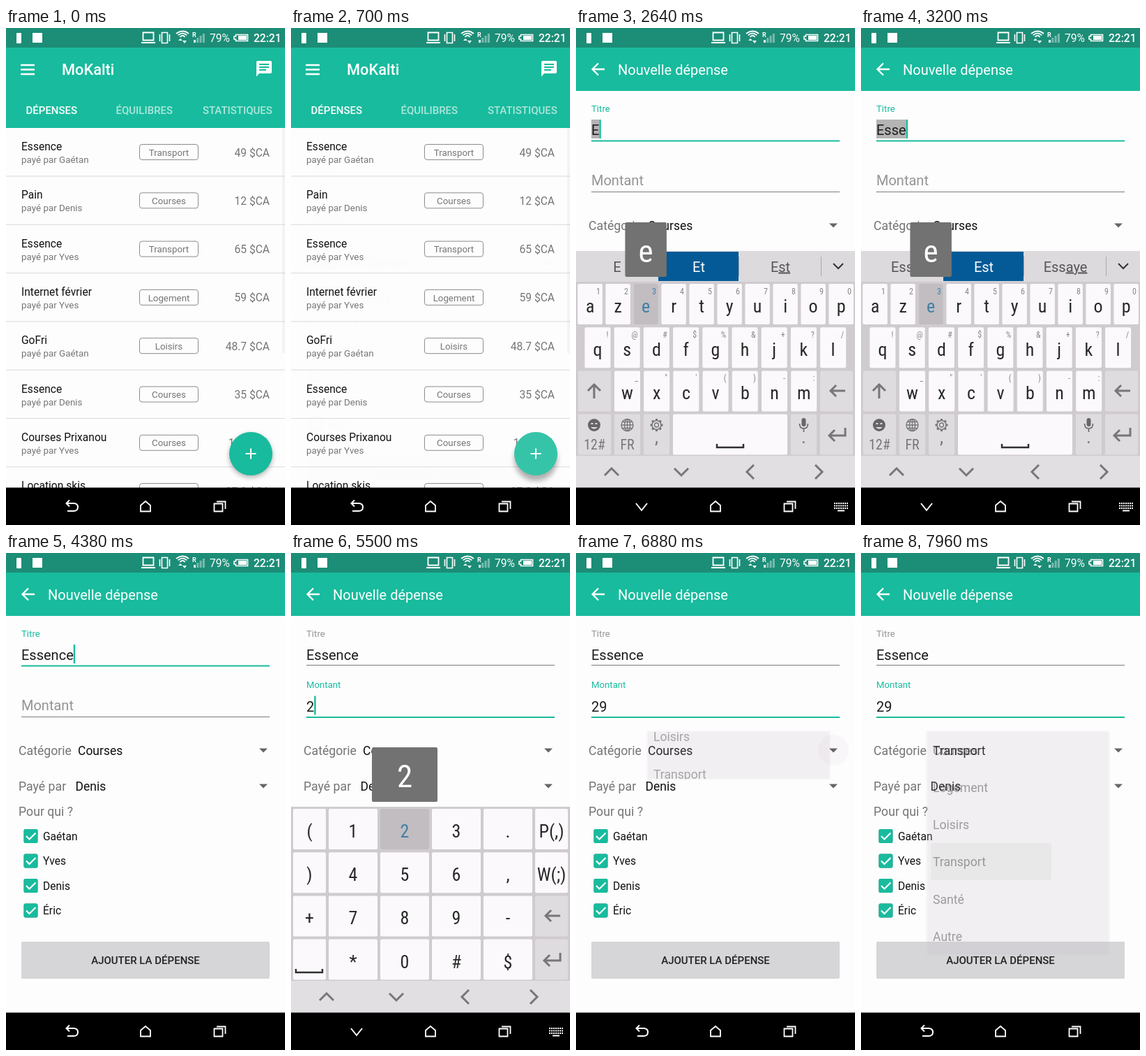
An HTML page for the animation above (8000 ms loop, 400 by 711 pixels).

```html
<!DOCTYPE html>
<html lang="fr">
<head>
<meta charset="utf-8">
<title>Nouvelle dépense</title>
<style>
html, body { margin: 0; width: 100%; height: 100%; overflow: hidden; background: #fdfdfd; }
svg { display: block; width: 100vw; height: 100vh; font-family: Roboto, "Noto Sans", sans-serif; }
text { white-space: pre; }
#letters, #numbers, #press { font-family: "Roboto Condensed", Roboto, "Noto Sans", sans-serif; font-stretch: condensed; }
</style>
</head>
<body>
<svg id="stage" viewBox="0 0 400 711"></svg>
<script>
const LOOP = 8000, TEAL = '#18bb9d', GREY = '#757575', PAPER = '#fdfdfd';
const esc = s => s.replace(/&/g, '&amp;').replace(/</g, '&lt;');
const text = (x, y, size, str, fill = '#111', more = '') =>
  `<text x="${x}" y="${y}" font-size="${size}" fill="${fill}" ${more}>${esc(str)}</text>`;
const mid = (x, y, size, str, fill, more = '') => text(x, y, size, str, fill, 'text-anchor="middle" ' + more);
const rect = (x, y, w, h, fill, more = '') =>
  `<rect x="${x}" y="${y}" width="${w}" height="${h}" fill="${fill}" ${more}/>`;
const line = (d, stroke = '#fff', w = 2, more = '') =>
  `<path d="${d}" fill="none" stroke="${stroke}" stroke-width="${w}" ${more}/>`;
const shape = (d, fill = '#fff', more = '') => `<path d="${d}" fill="${fill}" ${more}/>`;
const group = (id, body, more = '') => `<g id="${id}" ${more}>${body}</g>`;
const BOLD = 'font-weight="500"';

const people = ['Gaétan', 'Yves', 'Denis', 'Éric'];
const categories = ['Courses', 'Logement', 'Loisirs', 'Transport', 'Santé', 'Autre'];
const expenses = [
  ['Essence', 0, 3, '49'], ['Pain', 2, 0, '12'], ['Essence', 1, 3, '65'],
  ['Internet février', 1, 1, '59'], ['GoFri', 0, 2, '48.7'], ['Essence', 2, 0, '35'],
  ['Courses Prixanou', 1, 0, '120'], ['Location skis', 0, 2, '27.3']
];

function statusBar() {
  const wifi = [4, 7, 10].map(r =>
    line(`M${253 - r * .9} ${16 - r * .8}Q253 ${14 - r * 1.3} ${253 + r * .9} ${16 - r * .8}`, '#fff', 1.8)).join('');
  const bars = [0, 1, 2, 3].map(i =>
    rect(269 + i * 4.3, 17 - i * 3, 3, 4 + i * 3, '#fff', `opacity="${i ? .4 : .9}"`)).join('');
  return rect(0, 0, 400, 28, '#1c8d77') + rect(15, 7, 7, 15, '#fff', 'rx="1"') +
    rect(38, 7, 14, 14, '#fff') +
    line('M196.500 6.500H211.500V17.500H196.500ZM194 21H214', '#fff', 1.8) +
    line('M223.500 6.500H231.500V21.500H223.500ZM220.500 9V19M234.500 9V19', '#fff', 1.6) +
    wifi + shape('M247 18l3-3 3 3zM253 18h6l-3 4z') + bars +
    text(267, 13, 9, 'R', '#fff', 'font-weight="700"') +
    text(292, 20, 15.6, '79%', '#fff') +
    line('M329.500 9.500H346.500V18.500H329.500V16H327V12H329.500Z', '#fff', 1.6) + rect(333, 11, 12, 6, '#fff') +
    text(355, 20, 15.6, '22:21', '#fff', BOLD);
}

function listScreen() {
  const rows = expenses.map(([title, who, cat, sum], i) => {
    const y = 69.3 * i;
    return `<g transform="translate(0 ${y})">` + text(22, 175, 15.6, title) +
      text(22, 193, 13.4, 'payé par ' + people[who], GREY) +
      rect(191.5, 166.5, 84, 22, 'none', 'rx="3.5" stroke="#8c8c8c"') +
      mid(233.5, 182.7, 13.3, categories[cat], GREY) +
      text(378, 183.5, 15.6, sum + ' $CA', GREY, 'text-anchor="end"') +
      rect(0, 211.5, 400, 1, '#dadada') + '</g>';
  }).join('');
  return rect(0, 28, 400, 683, PAPER) + rows + rect(396, 143, 4, 322, '#000', 'opacity=".04"') +
    rect(0, 28, 400, 115, TEAL) +
    line('M21 53H41M21 59.500H41M21 66H41', '#fff', 2.3) + text(80, 67, 21.8, 'MoKalti', '#fff', BOLD) +
    shape('M361 47H379Q381 47 381 49V63Q381 65 379 65H363L359 69.500V49Q359 47 361 47ZM363 51V53H377V51ZM363 55V57H377V55ZM363 59V61H373V59Z', '#fff', 'fill-rule="evenodd"') +
    text(28.5, 122.5, 15, 'DÉPENSES', '#fff', BOLD) +
    text(157.5, 122.5, 15, 'ÉQUILIBRES', '#fff', BOLD + ' opacity=".65"') +
    text(282, 122.5, 15, 'STATISTIQUES', '#fff', BOLD + ' opacity=".65"') +
    '<circle id="fabShade" cx="351" cy="612" r="31" opacity=".3" filter="url(#soft)"/>' +
    `<circle cx="351" cy="609" r="31" fill="${TEAL}"/>` +
    '<circle id="fabRipple" cx="351" cy="609" r="0" fill="#fff"/>' +
    line('M343.500 609H358.500M351 601.500V616.500');
}

const field = (id, label, y) =>
  text(22, y - 10, 20, label, GREY, `id="${id}Label"`) + rect(22, y, 356, 1, '#7c7c7c', `id="${id}Line"`) +
  rect(22, y - 30, 0, 27, '#b4b4b4', `id="${id}Mark"`) +
  text(22, y - 8, 20, '', '#1c1c1c', `id="${id}Text"`) +
  rect(0, y - 30, 2.4, 27, TEAL, `id="${id}Caret"`);

function formScreen() {
  const arrow = y => shape(`M363 ${y}H375L369 ${y + 6}Z`, '#666');
  const boxes = people.map((name, i) => {
    const y = 395 + 35.5 * i;
    return rect(26.5, y + 1, 18, 18, 'none', 'rx="2" stroke="#757575" stroke-width="2"') +
      `<g class="check">${rect(25.5, y, 20, 20, TEAL, 'rx="2"')}${line(`M29 ${y + 10}L33.500 ${y + 14.5}L42.500 ${y + 5.5}`, '#fff', 2.2)}</g>` +
      text(53, y + 15.7, 15.6, name);
  }).join('');
  return rect(0, 28, 400, 683, PAPER) + rect(0, 28, 400, 62, TEAL) +
    line('M41 59H24M32 50.500L23.500 59L32 67.500', '#fff', 2.3) +
    text(60, 66.5, 20, 'Nouvelle dépense', '#fff') +
    field('title', 'Titre', 161) + field('sum', 'Montant', 234.5) +
    text(18, 288.5, 17.7, 'Catégorie', GREY) + text(103, 288.5, 17.5, '', '#111', 'id="category"') + arrow(279.5) +
    '<circle id="touch" cx="369" cy="282" r="22" fill="#603060"/>' +
    text(18, 339.5, 17.7, 'Payé par', GREY) + text(99.5, 339.5, 17.5, people[2]) + arrow(330.5) +
    text(18, 376, 17.7, 'Pour qui ?', GREY) + boxes +
    rect(22, 556, 356, 53, '#d6d6d8', 'rx="2"') + mid(200, 588, 15, 'AJOUTER LA DÉPENSE', '#222', BOLD);
}

const rowTop = r => 366 + 62.2 * r;
const keys = {};
const hintText = (x, y, w, hint, fill) => text(x + w - 3, y + 15, 12, hint, fill, 'text-anchor="end"');
function key(id, x, r, w, label, hint = '', soft = false) {
  const y = rowTop(r), size = label.length > 1 && soft ? 20 : 26;
  keys[id] = { x, y, w, label, hint };
  return rect(x, y, w, 58, soft ? '#dfdcdf' : '#fbf9fb', 'rx="2"') +
    mid(x + w / 2, y + (size < 26 ? 50 : 41), size, label, soft ? '#777' : '#282828') +
    hintText(x, y, w, hint, '#888');
}
const deleteIcon = y => line(`M386 ${y}H365M373 ${y - 8}L365 ${y}L373 ${y + 8}`, '#777', 3);
const enterIcon = y => line(`M386 ${y - 9}V${y + 2}H363M371 ${y - 6}L363 ${y + 2}L371 ${y + 10}`, '#777', 3);
const keyboardBase = () => rect(0, 363, 400, 249, '#cfcbcf') + rect(0, 612, 400, 46, '#e1dfe1') +
  line('M41 640L51 630L61 640M141 630L151 640L161 630M255 625L245 635L255 645M343 625L353 635L343 645', '#777', 3);

function letterKeyboard() {
  const run = (letters, hints, r, x0, pitch, w) =>
    [...letters].map((c, i) => key(c, x0 + pitch * i, r, w, c, hints[i])).join('');
  const spokes = [0, 1, 2, 3, 4, 5, 6, 7].map(i =>
    rect(114, 559, 3, 3, '#777', `transform="rotate(${i * 45} 115.500 568)"`)).join('');
  return keyboardBase() + run('azertyuiop', '1234567890', 0, 2.4, 40, 35.5) +
    run('qsdfghjkl', '!@#$%&+?/', 1, 12.5, 42.2, 37) +
    key('shift', 3, 2, 47, '', '', true) + run('wxcvbnm', '_"\'()-:', 2, 55, 42.2, 37) +
    key('del', 350, 2, 47, '', '', true) + key('num', 3, 3, 47, '12#', '', true) +
    key('lang', 55, 3, 37, 'FR', '', true) + key('comma', 97, 3, 37, ',', '', true) +
    key('space', 139, 3, 164, '') + key('dot', 308, 3, 37, '.', '', true) + key('enter', 350, 3, 47, '', '', true) +
    line('M26 530V510M17 519L26 510L35 519', '#777', 3) + deleteIcon(519) + enterIcon(581) +
    line('M202 595V600H240V595', '#303030', 2.5) +
    '<circle cx="26" cy="568" r="9" fill="#666"/>' +
    shape('M21.500 565h3v2h-3zM27.500 565h3v2h-3zM21 571Q26 576 31 571Z', '#dfdcdf') +
    '<g fill="none" stroke="#777" stroke-width="1.4"><circle cx="73.500" cy="568" r="8.500"/><ellipse cx="73.500" cy="568" rx="4" ry="8.500"/></g>' +
    line('M65 568H82M66.500 563.500H80.500M66.500 572.500H80.500M73.500 560V576', '#777', 1.3) +
    '<circle cx="115.500" cy="568" r="6.500" fill="none" stroke="#777" stroke-width="1.5"/><circle cx="115.500" cy="568" r="3" fill="none" stroke="#777" stroke-width="1.3"/>' + spokes +
    rect(323.5, 558, 6, 12, '#666', 'rx="3"') + line('M320.500 566Q320.500 573 326.500 573T332.500 566M326.500 573V578', '#666', 1.6);
}

function numberKeyboard() {
  const rows = [['(', '1', '2', '3', '.', 'P(,)'], [')', '4', '5', '6', ',', 'W(;)'],
    ['+', '7', '8', '9', '-', ''], ['', '*', '0', '#', '$', '']];
  return keyboardBase() + rows.map((row, r) => row.map((c, i) => {
    const x = i ? 54 + 74 * (i - 1) : 3, w = i % 5 ? 70 : 47;
    return key(c || `blank${r}${i}`, x, r, w, c, '', i === 5 && r > 1);
  }).join('')).join('') + line('M7 595V600H45V595', '#303030', 2.5) + deleteIcon(519) + enterIcon(581);
}

function navBar() {
  return rect(0, 657.5, 400, 54, '#000', 'id="navBack"') +
    group('backIcon', line('M86 680H97Q103 680 103 685.500T97 691H88M91 675.500L86.500 680L91 684.500')) +
    group('downIcon', line('M86 680L94 690L102 680') +
      [0, 1, 2].map(r => line(`M370 ${680 + r * 3.5}H390`, '#fff', 2.2, 'stroke-dasharray="2 1"')).join('') +
      line('M375 690.500H385', '#fff', 2)) +
    line('M193 691.500V683L200 677L207 683V691.500Z', '#fff', 1.8) +
    line('M298.500 680.500H310.500V691.500H298.500ZM302 677.500H314.500V688', '#fff', 1.8);
}

const menu = rect(0, 255, 262, 320, '#fafafa', 'id="menuBack"') +
  rect(6, 415, 173, 53, '#000', 'id="menuPress" rx="3"') +
  group('menuText', categories.map((c, i) => text(9, 288.5 + 53.3 * i, 17.6, c)).join(''));

const stage = document.getElementById('stage');
stage.innerHTML = `<defs><filter id="soft" x="-30%" y="-30%" width="160%" height="160%"><feGaussianBlur stdDeviation="3.500"/></filter>
  <filter id="crisp"><feGaussianBlur stdDeviation="1"/></filter>
  <clipPath id="menuClip">${rect(90, 255, 290, 0, '#000', 'id="menuWindow"')}</clipPath></defs>` +
  group('list', listScreen()) + group('form', formScreen()) +
  rect(0, 363, 400, 300, PAPER, 'id="resize"') +
  group('strip', '') + group('letters', letterKeyboard()) + group('numbers', numberKeyboard()) +
  group('press', '') +
  rect(94, 255, 262, 0, '#502850', 'id="menuShade" filter="url(#crisp)"') +
  group('menu', group('menuItems', menu), 'clip-path="url(#menuClip)"') +
  navBar() + statusBar();

const $ = {};
stage.querySelectorAll('[id]').forEach(el => $[el.id] = el);
const checks = stage.querySelectorAll('.check');
const set = (id, attrs) => { for (const k in attrs) $[id].setAttribute(k, attrs[k]); };
const show = (id, on) => set(id, { display: on ? 'inline' : 'none' });
const html = (id, s) => { if ($[id].source !== s) $[id].innerHTML = $[id].source = s; };
const span = (t, a, b) => Math.min(1, Math.max(0, (t - a) / (b - a)));
const out = p => 1 - (1 - p) ** 2;
const mix = (a, b, p) => a + (b - a) * p;

const taps = [['e', 2580, 2700], ['s', 2780, 2900], ['s', 2960, 3060], ['e', 3160, 3280], ['2', 5420, 5580], ['9', 5860, 6020]];
const hints = [['E', 'Et', 'E', 'st'], ['Es', 'Est', 'Es', 'sai'], ['Ess', 'Est', 'Ess', 'aye'], ['Esse', 'Essence', 'Esse', 'ntiel']];
const HINT_LAG = 100;
const typedAt = t => taps.slice(0, 4).filter(k => t >= k[1]).length;

function drawField(id, y, value, float, focus, caret, marked) {
  set(id + 'Label', {
    y: y - mix(10, 41.2, float), 'font-size': mix(20, 13.2, float), fill: focus && float > .3 ? TEAL : '#959595'
  });
  set(id + 'Line', focus ? { y: y - .5, height: 2, fill: TEAL } : { y: Math.floor(y - .5), height: 1, fill: '#7c7c7c' });
  $[id + 'Text'].textContent = value;
  const w = value ? $[id + 'Text'].getComputedTextLength() : 0;
  set(id + 'Mark', { width: marked ? w : 0 });
  set(id + 'Caret', { x: 22 + w });
  show(id + 'Caret', caret);
}

function drawKeyboard(id, t, up0, up1, down0, down1) {
  const p = t < down0 ? span(t, up0, up1) : 1 - span(t, down0, down1);
  show(id, p > 0);
  set(id, { transform: `translate(0 ${294 * (1 - p)})`, opacity: Math.min(1, p * 1.15) });
  return p;
}

function drawPress(t) {
  const tap = taps.find(([, a, b]) => t >= a && t < b + 120);
  if (!tap) return html('press', '');
  const [id, , end] = tap, { x, y, w, label, hint } = keys[id], cx = x + w / 2;
  const held = t < end, ink = '#417fa5';
  html('press', `<g opacity="${held ? 1 : 1 - span(t, end, end + 120)}">` +
    rect(x, y, w, 58, '#c1bdc1', 'rx="2"') + mid(cx, y + 41, 26, label, ink) + hintText(x, y, w, hint, ink) + '</g>' +
    (held ? rect(x - 12, y - 88, w + 24, 78, '#727272', 'rx="2"') + mid(cx, y - 31, 45, label, '#fff') : ''));
}

function drawStrip(t) {
  const typed = typedAt(t);
  if (!typed || t > 3460) return html('strip', '');
  const [left, best, stem, tail] = hints[Math.max(1, typedAt(t - HINT_LAG)) - 1];
  html('strip', rect(0, 319, 400, 44, '#dddadd') + mid(59, 348.5, 20, left, '#555') +
    rect(118, 320, 115, 42, '#045a96') + mid(176, 348.5, 20, best, '#fff') +
    `<text x="293" y="348.500" font-size="20" fill="#555" text-anchor="middle">${stem}<tspan text-decoration="underline">${tail}</tspan></text>` +
    rect(233, 327, 1, 28, '#aaa') + rect(351, 327, 1, 28, '#aaa') + line('M369 337L376 344L383 337', '#333', 2));
}

function drawMenu(t) {
  const open = t >= 6880, p = out(span(t, 6880, 7200)), h = mix(67, 320, p), x = mix(102, 94, p);
  const alpha = mix(.33, 1, span(t, 6880, 7080)) * (1 - span(t, 7820, 8045));
  show('menu', open);
  show('menuShade', open);
  set('menuWindow', { height: h });
  set('menuShade', { x, height: h, opacity: mix(.06, .16, alpha * alpha) });
  set('menuItems', { transform: `translate(${x} ${(h - 320) / 2})` });
  set('menuBack', { opacity: alpha * alpha });
  set('menuText', { opacity: alpha });
  set('menuPress', { opacity: .08 * alpha * span(t, 7680, 7800) });
  set('touch', { opacity: open ? .03 * (1 - span(t, 6960, 7200)) : 0 });
  $.category.textContent = categories[t < 7820 ? 0 : 3];
}

function draw(t) {
  const ripple = span(t, 340, 640);
  set('fabRipple', { r: 31 * out(ripple), opacity: .3 * (1 - span(t, 560, 800)) });
  set('fabShade', { cy: mix(612, 617, ripple) });
  const enter = span(t, 700, 1020);
  show('list', enter < 1);
  show('form', enter > 0);
  set('form', { opacity: Math.min(1, enter * 1.5), transform: `translate(0 ${55 * (1 - out(enter))})` });
  checks.forEach(c => c.setAttribute('opacity', span(t, 1180, 1400)));

  const typed = typedAt(t);
  const digits = taps.slice(4).filter(k => t >= k[1]).length;
  const onSum = t >= 4440;
  drawField('title', 161, t < 3360 ? 'Esse'.slice(0, typed) : 'Essence', span(t, 1220, 1420),
    t >= 1220 && !onSum, typed > 0 && !onSum, typed > 0 && t < 3360);
  drawField('sum', 234.5, '29'.slice(0, digits), span(t, 4440, 4640), onSum, digits > 0 && t < 6420, false);

  const a = drawKeyboard('letters', t, 1840, 2073, 3480, 3760);
  const b = drawKeyboard('numbers', t, 4760, 5040, 6420, 6590);
  const k = Math.max(a, b);
  show('resize', (t >= 1780 && t < 3480) || (t >= 4720 && t < 6420));
  set('navBack', { opacity: k > 0 && k < 1 ? .57 : 1 });
  show('backIcon', k === 0);
  show('downIcon', k > 0);
  drawStrip(t);
  drawPress(t);
  drawMenu(t);
}

const start = performance.now();
function tick() {
  draw((performance.now() - start) % LOOP);
  requestAnimationFrame(tick);
}
tick();
</script>
</body>
</html>
```
